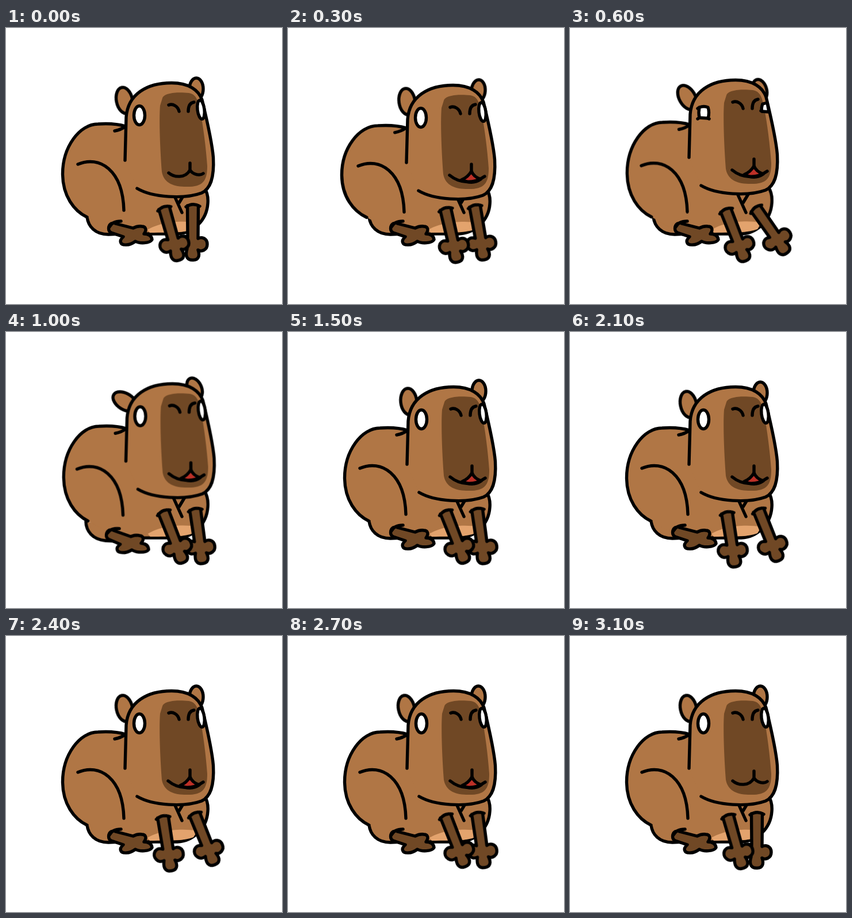
Write an HTML page without scripts that moves like this. It is 480 by 480 pixels and loops after 3.2 s.

```html
<!DOCTYPE html>
<html lang="en">
<head>
<meta charset="utf-8">
<title>Capybara</title>
<style>
html, body { margin: 0; width: 100%; height: 100%; overflow: hidden; background: #fff; }
svg { display: block; width: 100vw; height: 100vh; }
svg * { animation: 3.2s step-end infinite; }
.line { fill: none; stroke: #000; stroke-width: 5.4; stroke-linecap: round; stroke-linejoin: round; }
.fur { fill: #b07645; }
.dark { fill: #704825; }
.white { fill: #fff; }
.tongue { fill: #bd3027; }

.body { transform-origin: 351px 358px; animation-name: body; }
.haunch { animation-name: haunch; }
.head { animation-name: head; }
.foot { transform-origin: 190px 348px; animation-name: foot; }
.ear-l { animation-name: ear-l; }
.ear-r { animation-name: ear-r; }
.leg-l { animation-name: leg-l; }
.leg-r { animation-name: leg-r; }
.round { animation-name: round; }
.squint { animation-name: squint; }
.shut { animation-name: shut; }
.open { animation-name: open; }

/* one pose lasts 3.125% = 100 ms */
@keyframes body {
  0%, 40.625%, 100% { transform: none; }
  6.25%, 12.5% { transform: scale(1.01, .995); }
  9.375% { transform: scale(1.02, .985); }
  15.625% { transform: scale(1, 1.005); }
  18.75% { transform: scale(.997, 1.015); }
  25% { transform: scale(.993, 1.016); }
  37.5% { transform: scale(.997, 1.006); }
}
@keyframes haunch {
  0%, 40.625%, 100% { transform: none; }
  9.375% { transform: translate(-3px, 3px); }
  15.625% { transform: translate(-1px, 2.5px); }
  25% { transform: translate(-1.5px, 1.5px); }
}
@keyframes head {
  0%, 40.625%, 100% { transform: none; }
  6.25%, 12.5% { transform: translate(0, 2px); }
  9.375% { transform: translate(-1px, 4px); }
  15.625% { transform: translate(0, -2px); }
  18.75% { transform: translate(0, -5px); }
  25% { transform: translate(1px, -5px); }
  28.125% { transform: translate(1.5px, -5.5px); }
  37.5% { transform: translate(1px, -2px); }
}
@keyframes foot {
  0%, 40.625%, 100% { transform: none; }
  12.5% { transform: translate(2px, 0); }
  18.75% { transform: translate(4px, 0); }
  25% { transform: translate(0, 2px); }
  28.125% { transform: translate(-4px, 5px) rotate(5deg); }
  37.5% { transform: translate(-1px, 2px); }
}
@keyframes ear-l {
  0%, 62.5%, 100% { transform: translate(206px, 126px) rotate(-12deg); }
  9.375% { transform: translate(207px, 128px) rotate(-8deg); }
  15.625% { transform: translate(205px, 123px) rotate(-22deg); }
  18.75% { transform: translate(204px, 121px) rotate(-30deg); }
  25% { transform: translate(205px, 121px) rotate(-44deg); }
  28.125% { transform: translate(207px, 121px) rotate(-58deg); }
  37.5% { transform: translate(206px, 122px) rotate(-30deg); }
  40.625% { transform: translate(210px, 119px) rotate(-4deg); }
  46.875% { transform: translate(210px, 121px) rotate(-6deg); }
  50% { transform: translate(207px, 124px) rotate(-10deg); }
  53.125% { transform: translate(205px, 126px) rotate(-14deg); }
}
@keyframes ear-r {
  0%, 62.5%, 100% { transform: translate(331px, 106px); }
  9.375% { transform: translate(331px, 109px) rotate(4deg); }
  15.625% { transform: translate(331px, 107px) rotate(-8deg); }
  18.75% { transform: translate(330px, 108px) rotate(-16deg); }
  25% { transform: translate(329px, 103px) rotate(-20deg); }
  28.125% { transform: translate(328px, 98px) rotate(-25deg); }
  37.5% { transform: translate(330px, 100px) rotate(-12deg); }
  40.625% { transform: translate(332px, 99px) rotate(3deg); }
  46.875% { transform: translate(332px, 103px); }
  50% { transform: translate(330px, 105px) rotate(-4deg); }
  53.125% { transform: translate(328px, 107px) rotate(-10deg); }
}
@keyframes leg-l {
  0%, 96.875%, 100% { transform: translate(275px, 313px) rotate(-16deg); }
  9.375% { transform: translate(274px, 315px) rotate(-13deg); }
  15.625% { transform: translate(272px, 316px) rotate(-18deg); }
  18.75% { transform: translate(271px, 317px) rotate(-21.5deg); }
  28.125% { transform: translate(274px, 314px) rotate(-15deg); }
  31.25%, 43.75%, 56.25%, 68.75%, 81.25%, 93.75% { transform: translate(274px, 313px) rotate(-21.5deg); }
  25%, 37.5%, 50%, 62.5%, 75%, 87.5% { transform: translate(273px, 315px) rotate(-9deg); }
}
@keyframes leg-r {
  0%, 96.875%, 100% { transform: translate(325px, 309px); }
  9.375% { transform: translate(325px, 310px) rotate(-10deg); }
  12.5% { transform: translate(324px, 311px) rotate(-20deg); }
  15.625% { transform: translate(323px, 312px) rotate(-29deg); }
  18.75% { transform: translate(323px, 314px) rotate(-35deg); }
  28.125% { transform: translate(326px, 312px) rotate(-20deg); }
  31.25%, 43.75%, 56.25%, 68.75%, 81.25%, 93.75% { transform: translate(329px, 309px) rotate(-8deg); }
  37.5%, 50%, 62.5%, 75%, 87.5% { transform: translate(328px, 310px) rotate(-22deg); }
}
@keyframes round { 0%, 25%, 100% { visibility: visible; } 15.625% { visibility: hidden; } }
@keyframes squint { 0%, 25%, 100% { visibility: hidden; } 15.625% { visibility: visible; } }
@keyframes shut { 0%, 96.875%, 100% { visibility: visible; } 9.375% { visibility: hidden; } }
@keyframes open { 0%, 96.875%, 100% { visibility: hidden; } 9.375% { visibility: visible; } }
</style>
</head>
<body>
<svg viewBox="0 0 480 480">
  <defs>
    <g id="leg">
      <path class="line dark" d="M-9.500 0L-9 55C-21 48 -30 62 -23 71C-19 77 -14 76 -10 75C-15 91 -7 95 0 94.500C9 95 13 88 9 77C15 81 25 77 25 67C25 56 15 54 9 57L9.500 0"/>
      <path class="line dark" d="M-12 2Q0 -6 12 1"/>
    </g>
  </defs>

  <g class="ear-l"><ellipse class="line fur" rx="14" ry="23"/></g>
  <g class="ear-r"><ellipse class="line fur" rx="12" ry="19"/></g>

  <path class="foot line fur" d="M141 329C143 345 155 359 178 359L200 358V330"/>
  <g class="body">
    <path class="line fur" d="M195 358H298C325 357 349 335 351 305C352 293 349 284 345 278L280 200L208 171C195 167 175 166 160 167C128 167 98 207 98.500 255C99 292 118 318 141 329"/>
    <path fill="#e3a36d" d="M246 351C264 339 302 333 333 339L326 350C310 356 290 355.500 250 356Z"/>
    <path class="line" d="M189 179Q200 177 208 171"/>
  </g>
  <path class="haunch line" d="M125 237C163 221 203 247 205 317"/>
  <path class="line" d="M291 288L306 321M310 289L301 304"/>

  <g class="foot">
    <path class="line dark" d="M183 340C177 344 177 353 183 356L204 363C196 370 198 378 210 377C217 377 221 374 225 371C232 375 250 375 254 368C253 360 246 358 240 358C246 350 242 345 236 345C229 344 225 346 221 348L190 340"/>
    <path class="line" d="M200 336C190 336 183 339 180 346"/>
  </g>

  <g class="leg-r"><use href="#leg"/></g>
  <g class="leg-l"><use href="#leg"/></g>

  <g class="head">
    <path class="line fur" d="M207 230L209 155C212 115 245 95.500 288 95.500C318 95.500 335 108 341 125C347 150 358 195 360.500 225C362.500 262 355 280 340 287C310 298 255 295 228 279"/>
    <path class="dark" d="M272 122C275 112 300 111 318 113C329 115 333 122 337 140C343 170 348 210 350 240C350 262 345 275 320 276C295 277 275 272 271 250C268 210 266 160 268 135Z"/>
    <path class="line" d="M283 134C290 131 299 136 301 145M327 129C320 130 317 136 317 145"/>

    <g class="round">
      <ellipse class="line white" cx="232" cy="152" rx="9.500" ry="16.500"/>
      <ellipse class="line white" cx="339" cy="142" rx="6" ry="16.500" transform="rotate(-7 339 142)"/>
    </g>
    <g class="squint">
      <path class="line white" d="M225 143Q233 140 240 143Q243 152 240 162L225 161Q223 152 225 143Z"/>
      <path class="line white" d="M335 137L343 135L346 151L334 150Q332 145 335 137Z"/>
      <path class="line" d="M222 145L225 143M222 163L225 161M240 162L242 163M332 149L334 150"/>
    </g>

    <path class="line shut" d="M283 252C292 260 312 262 320 247L320 235M320 247C326 256 338 257 343 253"/>
    <g class="open">
      <path class="line tongue" d="M320 245C316 252 310 257 303 260C316 266 326 266 336 259C327 256 322 250 320 245Z"/>
      <path class="line" d="M282 252C300 267 325 267 343 254M320 233V246"/>
    </g>
  </g>
</svg>
</body>
</html>
```
